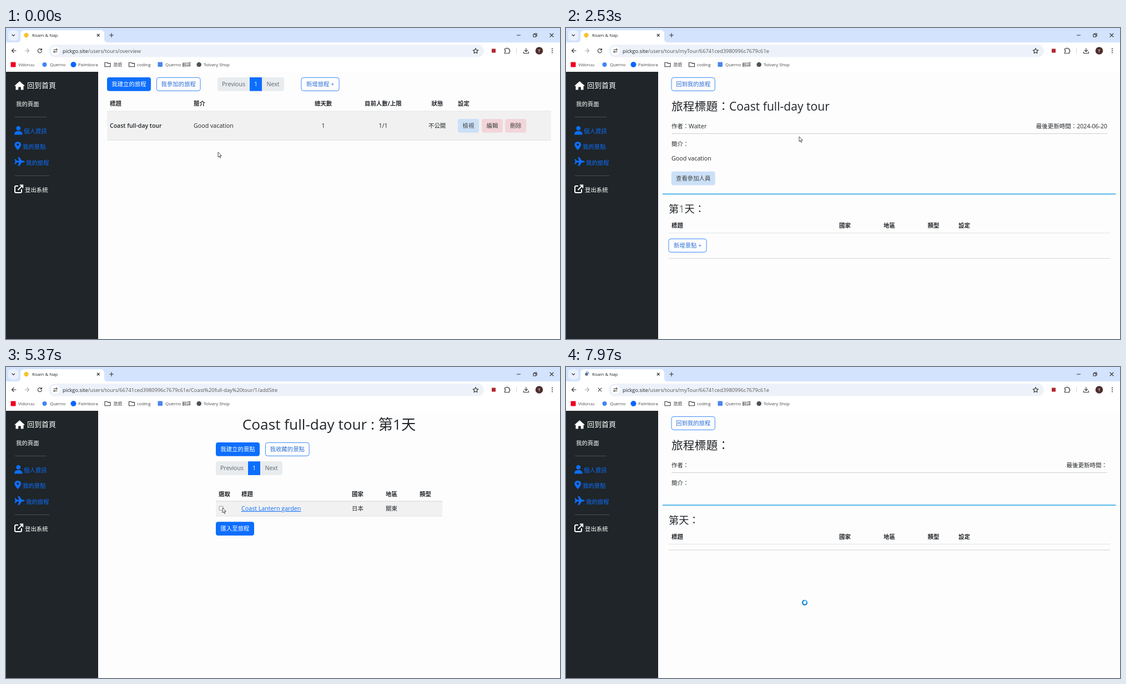
Write an HTML page that moves like this. It is 998 px wide and 561 px high and loops after 8 s.

```html
<!DOCTYPE html>
<html lang="zh-Hant">
<head>
<meta charset="utf-8">
<style>
html, body { margin: 0; width: 100%; height: 100%; overflow: hidden; background: #fdfdfd; }
svg { display: block; width: 100%; height: 100%; }
text { font-family: "Open Sans", "Noto Sans CJK TC", "Noto Sans CJK JP", "Noto Sans CJK", "Noto Sans", sans-serif; fill: #212529; }
.line { fill: none; stroke: #333; stroke-width: 1.1; stroke-linecap: round; stroke-linejoin: round; }
</style>
</head>
<body>
<svg id="stage" viewBox="0 0 998 561"></svg>
<script>
const BLUE = '#0d6efd', INK = '#212529';
const TRIP = 'Coast full-day tour', SITE = 'Roam & Nap';
const esc = s => s.replace(/&/g, '&amp;');

const text = (x, y, s, size = 10.4, attrs = '') =>
  `<text x="${x}" y="${y}" font-size="${size}" ${attrs}>${esc(s)}</text>`;
const mid = (x, y, s, size, attrs = '') => text(x, y, s, size, 'text-anchor="middle" ' + attrs);
const rect = (x, y, w, h, fill, r = 0, attrs = '') =>
  `<rect x="${x}" y="${y}" width="${w}" height="${h}" rx="${r}" fill="${fill}" ${attrs}/>`;
const dot = (x, y, r, fill) => `<circle cx="${x}" cy="${y}" r="${r}" fill="${fill}"/>`;
const path = (d, attrs = 'class="line"') => `<path d="${d}" ${attrs}/>`;
const rule = (x1, x2, y, color = '#d6d5d2', w = 1) =>
  path(`M${x1} ${y}H${x2}`, `stroke="${color}" stroke-width="${w}"`);
const group = (id, body) => `<g id="${id}">${body}</g>`;
const bold = (x, y, s) => text(x, y, s, 10.4, 'font-weight="700"');

function button(x, y, w, label, fill, color = 'white') {
  const open = fill === 'none';
  const box = open
    ? rect(x + .4, y + .4, w - .8, 24, 'none', 4, `stroke="${BLUE}" stroke-width=".8"`)
    : rect(x, y, w, 24.7, fill, 4);
  return box + mid(x + w / 2, y + 16, label, 10.4, `style="fill:${open ? '#2f6fd8' : color}"`);
}

const pager = (x, y) =>
  rect(x, y, 120, 24.7, '#e9ecef', 4) + rect(x + 58, y, 22, 24.7, BLUE) +
  mid(x + 29, y + 16, 'Previous', 10.6, 'style="fill:#5c646b"') +
  mid(x + 69, y + 16, '1', 10.6, 'style="fill:white"') +
  mid(x + 100, y + 16, 'Next', 10.6, 'style="fill:#5c646b"');

const folder = x => path(`M${x} 62.2h3.6l1.4 1.4h5v6.2h-10z`);
const mark = s => text(s[0], 69, s[1], 7.9, 'style="fill:#474747"');

function browser() {
  const gray = 'class="line" style="stroke:#aaa"';
  return rect(0, 0, 998, 26, '#d3e3fd') + rect(4, 4, 18.5, 18.5, '#eaf1fd', 6) +
    path('M11 12l2.3 2.3L15.6 12') +
    path('M20 26q6 0 6-6v-9q0-7 7-7h137q7 0 7 7v9q0 6 6 6z', 'fill="white"') +
    path('M164.2 11l4 4m0-4l-4 4M186.5 13h7m-3.5-3.5v7M920.5 13h6M980 10l6 6m0-6l-6 6') +
    path('M950 11.5h4.5v4.5h-4.5zM951.5 11.5V10h4.7v4.7h-1.5') +
    group('icon', dot(36.5, 13, 4.2, '#f4c430')) +
    group('busyIcon', dot(37, 13, 2.8, '#5f6f88') +
      '<path id="arc" d="M37 8.8a4.2 4.2 0 0 1 4.2 4.2" fill="none" stroke="#1a73e8" stroke-width="1.1"/>') +
    '<g clip-path="url(#tab)"><text id="title" x="47" y="16" font-size="7.9"></text></g>' +
    rect(138, 7, 19, 13, 'url(#fade)') +
    rect(0, 26, 998, 53, 'white') +
    path('M18 41h-7.5m3.5-3.5L10.5 41l3.5 3.5') + path('M34 41h7.5m-3.5-3.5l3.5 3.5-3.5 3.5', gray) +
    group('reload', path('M64 39.2a3.6 3.6 0 1 0 .5 2.6M64.4 37v2.6h-2.6')) +
    group('stop', path('M58.2 38.2l5.6 5.6m0-5.6l-5.6 5.6')) +
    rect(77, 30, 784, 22.5, '#edf1fa', 11.2) + dot(89, 41, 8, 'white') +
    path('M86 39h2.5M92 43h-2.5') +
    '<g fill="none" stroke="#333"><circle cx="91" cy="39" r="1.3"/><circle cx="87" cy="43" r="1.3"/></g>' +
    '<text x="102" y="44.6" font-size="9.3">pickgo.site<tspan id="url" fill="#555"></tspan></text>' +
    path('M846 36.6l1.4 3 3.3.4-2.4 2.2.6 3.3-2.9-1.6-2.9 1.6.6-3.3-2.4-2.2 3.3-.4z') +
    rect(875, 37.5, 7, 7, '#b3262e') +
    path('M898.5 37.5h2.5a1.5 1.5 0 0 1 3 0h2.5v2.6a1.5 1.5 0 0 1 0 3v2.6h-8v-2.6a1.5 1.5 0 0 0 0-3z') +
    path('M919.5 36.5v9', 'stroke="#c6d6f3"') +
    path('M937 36.5v6m-2.6-2.5l2.6 2.6 2.6-2.6M932.5 43v2.5h9V43') +
    dot(960.5, 41, 6.8, '#4e2f2c') + mid(960.5, 43.8, 'T', 7.5, 'style="fill:white"') +
    [37.5, 41, 44.5].map(y => dot(984, y, 1, '#333')).join('') +
    rect(8.5, 61.5, 9, 9, '#f00020', 1) + dot(69.5, 66, 4, '#4285f4') +
    dot(121.5, 66, 5, '#0866ff') + folder(178) + folder(221.5) +
    rect(273.5, 61.5, 8.5, 8.5, '#4b86ec', 1) + dot(347.7, 66, 4.3, '#4b5157') +
    [[22, 'Vidoruu'], [79, 'Querno'], [130, 'Palmbora'], [193.5, '旅遊'], [236, 'coding'],
     [287, 'Querno 翻譯'], [356, 'Tolvary Shop']].map(mark).join('');
}

function sidebar() {
  const white = 'style="fill:white"', blue = `style="fill:${BLUE}"`;
  return rect(0, 79, 166, 482, '#1f2528') +
    path('M15 104.5L24.5 96l9.5 8.5h-2.5v7h-4.7v-5h-4.6v5h-4.7v-7z', 'fill="white"') +
    text(38, 108, '回到首頁', 13, white) + text(18, 141, '我的頁面', 10.4, white) +
    rule(16, 73, 160.5, '#565c60', .8) + rule(16, 78, 266.5, '#565c60', .8) +
    dot(22.3, 180.8, 3.9, BLUE) + path('M15 192.5q0-6.5 6-6.5h2.6q6 0 6 6.5z', `fill="${BLUE}"`) +
    path('M21.3 220.5q-6-7-6-10a6 5.6 0 0 1 12 0q0 3-6 10zm0-12a2 2 0 1 0 .01 0z', `fill="${BLUE}" fill-rule="evenodd"`) +
    path('M15.5 236.5h1.8l2.5 3h3.8l-2.2-6.5h2.6l4.6 6.5h3q2.2.6 2.2 1.5t-2.2 1.5h-3l-4.6 6.5h-2.6l2.2-6.5h-3.8l-2.5 3h-1.8l1.3-4.5z', `fill="${BLUE}"`) +
    text(32, 190, '個人資訊', 10.4, blue) + text(30, 218, '我的景點', 10.4, blue) +
    text(36, 246.5, '我的旅程', 10.4, blue) +
    path('M22 285h-4q-2 0-2 2v8q0 2 2 2h8q2 0 2-2v-4M25 283.5h5.2v5.2M30 283.7l-8.5 8.5',
      'fill="none" stroke="white" stroke-width="2"') +
    text(34, 296, '登出系統', 10.4, white);
}

function overview() {
  return button(182, 89, 79, '我建立的旅程', BLUE) + button(271, 89, 79.5, '我參加的旅程', 'none') +
    pager(381, 89) + button(531.5, 89, 69, '新增旅程 +', 'none') +
    bold(187, 140, '標題') + bold(338, 140, '簡介') + bold(556, 140, '總天數') +
    bold(646, 140, '目前人數/上限') + bold(766.5, 140, '狀態') + bold(814, 140, '設定') +
    rect(182, 150, 800, 52, '#f1f1f1') + rule(182, 982, 150, '#e3e5e8') + rule(182, 982, 202.3, '#dcdfe2') +
    text(187, 180, TRIP, 10.5, 'font-weight="600"') + text(338, 180, 'Good vacation', 10.7) +
    mid(571.5, 180, '1', 10.7) + mid(679.5, 180, '1/1', 10.7) + text(761, 180, '不公開') +
    button(814, 164, 38, '檢視', '#cbe0f7', '#444') +
    button(857, 164, 38, '編輯', '#f2d5da', '#444') +
    button(899.3, 164, 38, '刪除', '#f2d5da', '#444');
}

function detail(full) {
  const thin = 'font-weight="300"', dy = full ? 50.3 : 0;
  return button(189.7, 89, 79, '回到我的旅程', 'none') +
    text(190, 149, '旅程標題：', 20.8, thin) + (full ? text(294, 149, TRIP, 21.1) : '') +
    text(190, 181, '作者：') + (full ? text(221, 181, 'Walter', 10.7) : '') +
    text(975, 181, '最後更新時間：' + (full ? '2024-06-20' : ''), 10.5, 'text-anchor="end"') +
    rule(190, 975, 190.5, '#d0cfc8') + text(190, 213, '簡介：') +
    (full ? text(190, 239, 'Good vacation', 10.7) +
      button(189.7, 258.7, 79, '查看參加人員', '#cbe0f7', '#444') : '') +
    `<g transform="translate(0 ${dy})">` +
    rule(174, 990.5, 249.2, '#51b4e8', 2) +
    text(185, 283, full ? '第1天：' : '第天：', 18.2, thin) +
    [[190, '標題'], [492, '國家'], [572, '地區'], [651.5, '類型'], [707, '設定']]
      .map(([x, s]) => bold(x, 309.7, s)).join('') +
    rule(185, 980, 319.5, '#dee2e6') + '</g>' +
    (full ? group('addBtn', button(184.5, 380, 69, '新增景點 +', 'none')) +
      group('addOn', button(184.5, 380, 69, '新增景點 +', BLUE)) : '') +
    rule(185, 980, full ? 415.5 : 330, full ? '#d5d6dc' : '#d3d1c8', 1.2);
}

function addPage() {
  return mid(582, 113, TRIP + ' : 第1天', 26.2, 'font-weight="400"') +
    button(378, 136, 79, '我建立的景點', BLUE) + button(467, 136, 79.5, '我收藏的景點', 'none') +
    pager(378, 170.3) +
    [[383, '選取'], [424, '標題'], [623, '國家'], [684, '地區'], [745, '類型']]
      .map(([x, s]) => bold(x, 232.5, s)).join('') +
    group('row', rect(378, 242, 408, 27, '#f1f1f1') + rule(378, 786, 269, '#dee2e6') +
      rect(384, 251.2, 7.2, 7.2, 'white', 1.3, 'stroke="#767676" stroke-width=".8"') +
      group('check', rect(383.6, 250.8, 8, 8, '#0b70eb', 1.3) +
        path('M385.4 254.9l1.6 1.7 2.9-3.5', 'fill="none" stroke="white" stroke-width="1.1"')) +
      text(424, 259, 'Coast Lantern garden', 10.7, `style="fill:${BLUE}" text-decoration="underline"`) +
      text(623, 259, '日本') + text(684, 259, '關東')) +
    rule(378, 786, 242, '#cfd3d8') +
    group('import', button(378, 279.3, 69, '匯入至旅程', BLUE));
}

const dialog = () =>
  rect(353, 50.5, 292, 94, 'white', 8, 'filter="url(#shadow)"') +
  text(366, 75, 'pickgo.site 顯示', 10.4) + text(366, 93, '新增成功', 8.45) +
  rect(588.6, 105.5, 45, 27, 'white', 13.5, 'stroke="#1a56ad" stroke-width="1.3"') +
  rect(590.5, 107.4, 41.2, 23.2, '#1a58b5', 11.6) +
  mid(611, 122, '確定', 8.3, 'style="fill:white"');

stage.innerHTML = `<defs>
  <clipPath id="tab"><rect x="46" y="5" width="111" height="18"/></clipPath>
  <linearGradient id="fade"><stop stop-color="white" stop-opacity="0"/><stop offset="1" stop-color="white"/></linearGradient>
  <filter id="shadow" x="-10%" y="-10%" width="120%" height="130%">
    <feDropShadow dx="0" dy="1" stdDeviation="1.8" flood-opacity=".45"/></filter></defs>` +
  rect(0, 0, 998, 561, '#fdfdfd') + browser() + sidebar() +
  group('overview', overview()) + group('empty', detail(false)) +
  group('full', detail(true)) + group('add', addPage()) + group('dialog', dialog()) +
  group('arrow', path('M0 0v8.8l2-1.8 1.5 3.3 1.4-.6L3.5 6.5h2.8z', 'fill="white" stroke="#222" stroke-width=".8"')) +
  group('ring', '<circle r="4" fill="none" stroke="#1583cf" stroke-width="2.2"/>' +
    path('M0-4a4 4 0 0 1 4 4', 'fill="none" stroke="#63c7f2" stroke-width="2.2"'));

const $ = id => document.getElementById(id);
const show = (id, on) => $(id).style.display = on ? '' : 'none';
const ID = '66741ced3980996c7679c61e';
const MY_TOUR = '/users/tours/myTour/' + ID;
const ADD = `/users/tours/${ID}/${TRIP.replace(/ /g, '%20')}/1/addSite`;

// time, x, y of the pointer
const moves = [[0, 382, 224], [30, 382, 224], [260, 560, 212], [400, 560, 212], [950, 833, 178],
  [1500, 833, 178], [1830, 813, 185], [2530, 420, 196], [2670, 405, 205], [3250, 216, 390],
  [3600, 216, 390], [3970, 341, 316], [4300, 420, 285], [4600, 430, 275], [5200, 390, 254],
  [5560, 390, 254], [6000, 438, 290], [6800, 440, 292], [7250, 440, 292], [7900, 430, 425], [8000, 430, 425]];

function pointer(t) {
  const i = moves.findIndex(m => m[0] > t);
  const [t0, x0, y0] = moves[i - 1], [t1, x1, y1] = moves[i];
  const p = (t - t0) / (t1 - t0), k = p * p * (3 - 2 * p);
  return [x0 + (x1 - x0) * k, y0 + (y1 - y0) * k];
}

function draw(now) {
  const t = now % 8000, within = (a, b) => t >= a && t < b;
  show('overview', t < 1400);
  show('empty', within(1400, 1950) || t >= 7450);
  show('full', within(1950, 4150));
  show('add', within(4150, 7450));
  show('addBtn', t < 3200);
  show('addOn', t >= 3200);
  show('row', t >= 4450);
  show('check', t >= 5500);
  $('import').setAttribute('transform', `translate(0 ${t < 4450 ? -27 : 0})`);
  $('import').setAttribute('opacity', t < 6350 ? 1 : .65);
  show('dialog', within(6790, 7250));
  $('dialog').setAttribute('opacity', Math.min(1, Math.max(0, (t - 6790) / 88)));

  const busy = within(1200, 1600) || within(3600, 4300) || t >= 7400;
  show('busyIcon', busy);
  show('icon', !busy);
  show('stop', busy);
  show('reload', !busy);
  $('arc').setAttribute('transform', `rotate(${t * .36} 37 13)`);
  $('title').textContent = within(3600, 4150) ? 'pickgo.site/users/tours/66741ced' : SITE;
  $('url').textContent = t < 1200 ? '/users/tours/overview' : within(3600, 7450) ? ADD : MY_TOUR;

  const [x, y] = pointer(t), wait = t >= 6700;
  show('arrow', !wait);
  show('ring', wait);
  $('arrow').setAttribute('transform', `translate(${x} ${y})`);
  $('ring').setAttribute('transform', `translate(${x} ${y}) rotate(${t * .36})`);
}

const start = performance.now();
function tick() {
  draw(performance.now() - start);
  requestAnimationFrame(tick);
}
tick();
</script>
</body>
</html>
```
